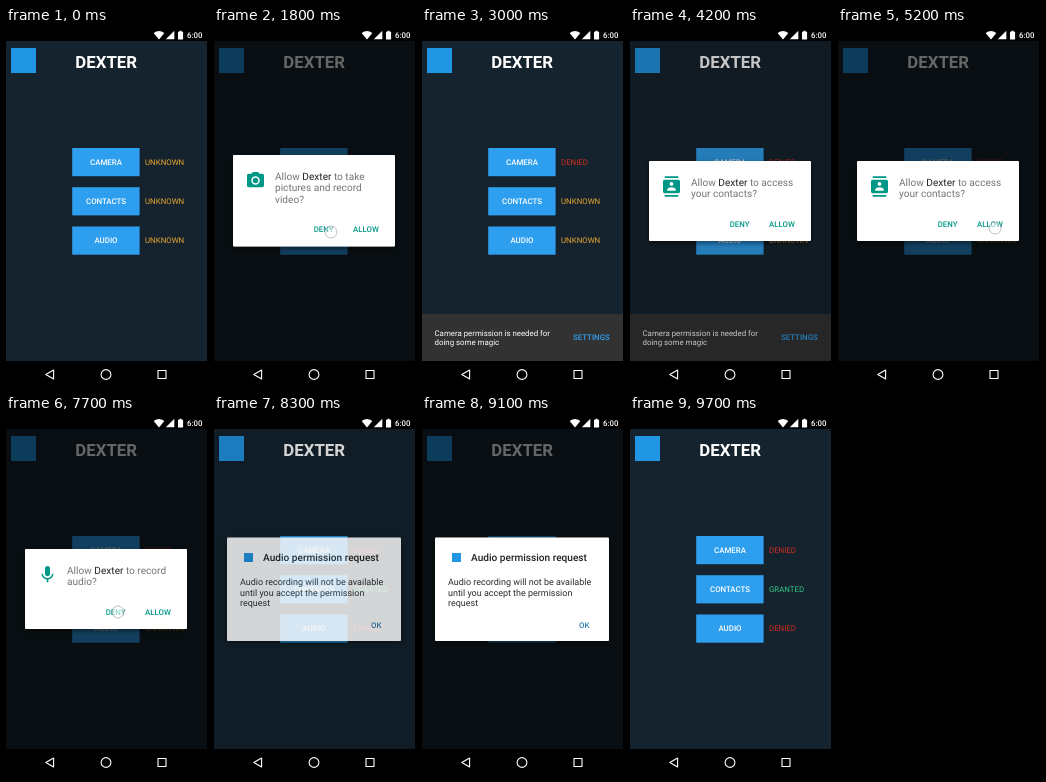
Animation of 202 by 360 pixels, one loop 9800 ms. Source, as an HTML page:

```html
<!DOCTYPE html>
<html lang="en">
<head>
<meta charset="utf-8">
<title>Permission requests</title>
<style>
  html, body { margin: 0; width: 100%; height: 100%; overflow: hidden; background: #000; }
  svg { display: block; width: 100vw; height: 100vh; }
  text { font: 400 7.86px Roboto, sans-serif; text-rendering: geometricPrecision; }
  .med { font-weight: 500; }
  .mid { text-anchor: middle; }
  .title { font-size: 16.83px; font-weight: 700; fill: #fff; }
  .ask { font-size: 10.1px; fill: #757575; }
  .body { font-size: 8.98px; fill: #2b2b2b; }
  .teal { fill: #009688; }
</style>
</head>
<body>
<svg id="stage" viewBox="0 0 202 360">
  <defs>
    <filter id="shadow" x="-20%" y="-20%" width="140%" height="150%">
      <feDropShadow dx="0" dy="2" stdDeviation="2.5" flood-color="#000" flood-opacity=".5"/>
    </filter>
    <clipPath id="screen"><rect width="201" height="333"/></clipPath>
  </defs>

  <g clip-path="url(#screen)">
    <rect width="202" height="333" fill="#14232d"/>
    <rect width="202" height="13"/>
    <rect x="5" y="20" width="25" height="25" fill="#2196e3"/>
    <text class="title mid" x="100.2" y="40">DEXTER</text>
    <g id="rows"></g>
    <g id="snack">
      <rect y="286" width="202" height="47" fill="#323232"/>
      <g fill="#fff">
        <text x="12.5" y="308">Camera permission is needed for</text>
        <text x="12.5" y="317.2">doing some magic</text>
      </g>
      <text class="med" x="151" y="312.4" fill="#2e9fee">SETTINGS</text>
    </g>
    <rect id="dim" width="202" height="333"/>
  </g>

  <g id="dialogs"></g>

  <g id="alert">
    <rect x="13" y="121.5" width="174" height="103.5" rx="1" fill="#fff" filter="url(#shadow)"/>
    <rect x="30" y="137" width="9" height="9" fill="#2196e3"/>
    <text class="med" x="49" y="144.8" style="font-size:10.1px" fill="#212121">Audio permission request</text>
    <text class="body" x="26" y="169.2">Audio recording will not be available</text>
    <text class="body" x="26" y="179.8">until you accept the permission</text>
    <text class="body" x="26" y="190.3">request</text>
    <text class="med" x="157" y="211.8" fill="#2a7fb0">OK</text>
  </g>

  <g id="touch">
    <circle r="6" fill="#fff" fill-opacity=".4" stroke="#888" stroke-opacity=".65" stroke-width=".8"/>
    <circle r="3" fill="#fff" fill-opacity=".35"/>
  </g>

  <g fill="#fff">
    <path d="M153 11.6L147.7 5Q153 1 158.3 5Z"/>
    <path d="M168.3 2.8V11.3H159.8Z"/>
    <path d="M172 3.7H173.5V2.7H175.6V3.7H177.1V11.5H172Z"/>
    <text class="med" x="181" y="10">6:00</text>
  </g>
  <rect y="333" width="202" height="27"/>
  <g fill="none" stroke="#fff" stroke-width="1.1" stroke-linejoin="round">
    <path d="M47.6 342V351L39.8 346.5Z"/>
    <circle cx="100" cy="346.5" r="4.9"/>
    <rect x="152" y="342.5" width="8" height="8"/>
  </g>
</svg>
<script>
const LOOP = 9800, STEP = 100, DIM = 0.6;
const $ = id => document.getElementById(id);
const clamp = v => Math.min(1, Math.max(0, v));
const ramp = (t, a, b) => clamp((t - a) / (b - a));
const easeOut = p => 1 - (1 - p) ** 3;

const COLORS = { UNKNOWN: '#e9a634', DENIED: '#d92c22', GRANTED: '#35c98c' };
const rows = [
  { name: 'CAMERA', y: 120, at: 2000, result: 'DENIED' },
  { name: 'CONTACTS', y: 159.2, at: 5400, result: 'GRANTED' },
  { name: 'AUDIO', y: 198.5, at: 8100, result: 'DENIED' }
];

const ICONS = {
  camera: 'M9 2L7.17 4H4c-1.1 0-2 .9-2 2v12c0 1.1.9 2 2 2h16c1.1 0 2-.9 2-2V6c0-1.1-.9-2-2-2h-3.17L15 2H9zm3 15c-2.76 0-5-2.24-5-5s2.24-5 5-5 5 2.24 5 5-2.24 5-5 5zM12 8.8a3.2 3.2 0 1 0 0 6.4 3.2 3.2 0 0 0 0-6.4z',
  contacts: 'M20 0H4v2h16V0zM4 24h16v-2H4v2zM20 4H4c-1.1 0-2 .9-2 2v12c0 1.1.9 2 2 2h16c1.1 0 2-.9 2-2V6c0-1.1-.9-2-2-2zm-8 2.75c1.24 0 2.25 1.01 2.25 2.25s-1.01 2.25-2.25 2.25S9.75 10.24 9.75 9 10.76 6.75 12 6.75zM17 17H7v-1.5c0-1.67 3.33-2.5 5-2.5s5 .83 5 2.5V17z',
  mic: 'M12 14c1.66 0 3-1.34 3-3V5c0-1.66-1.34-3-3-3S9 3.34 9 5v6c0 1.66 1.34 3 3 3zm5.3-3c0 3-2.54 5.1-5.3 5.1S6.7 14 6.7 11H5c0 3.41 2.72 6.23 6 6.72V21h2v-3.28c3.28-.48 6-3.3 6-6.72h-1.7z'
};

// "open" and "close" are the times when each window starts to fade
const dialogs = [
  { icon: 'camera', top: 127, h: 91.5, lines: ['to take', 'pictures and record', 'video?'], open: 850, close: 1900 },
  { icon: 'contacts', top: 133, h: 80, lines: ['to access', 'your contacts?'], open: 4050, close: 5300 },
  { icon: 'mic', top: 133, h: 80, lines: ['to record', 'audio?'], open: 6800, close: 8000 }
];
const alertBox = { open: 8190, close: 9500 };

const touches = [
  { x: 104, y: 137, from: 500, to: 800 },
  { x: 117, y: 204, from: 1600, to: 1900 },
  { x: 104, y: 176, from: 3700, to: 4000 },
  { x: 157, y: 200, from: 5000, to: 5300 },
  { x: 104, y: 216, from: 6400, to: 6750 },
  { x: 112, y: 196, from: 7700, to: 8000 },
  { x: 162, y: 209, from: 9400, to: 9600 }
];

$('rows').innerHTML = rows.map(r => `
  <rect x="66.2" y="${r.y}" width="67.4" height="28.2" fill="#2e9fee"/>
  <text class="med mid" x="100" y="${r.y + 16.9}" fill="#fff">${r.name}</text>
  <text class="status" x="139" y="${r.y + 16.9}"></text>`).join('');
const labels = document.querySelectorAll('.status');

$('dialogs').innerHTML = dialogs.map(d => {
  const [first, ...rest] = d.lines;
  const y = d.top + 24.5, foot = d.top + d.h - 14.2;
  const iconY = d.top + 15.3;
  return `<g>
    <rect x="19" y="${d.top}" width="162" height="${d.h}" rx="1" fill="#fff" filter="url(#shadow)"/>
    <path class="teal" fill-rule="evenodd" transform="translate(31.3 ${iconY}) scale(.85)" d="${ICONS[d.icon]}"/>
    <text class="ask" x="61" y="${y}">Allow <tspan fill="#212121">Dexter</tspan> ${first}</text>
    ${rest.map((s, i) => `<text class="ask" x="61" y="${y + 11.85 * (i + 1)}">${s}</text>`).join('')}
    <text class="med teal" x="99.7" y="${foot}">DENY</text>
    <text class="med teal" x="139" y="${foot}">ALLOW</text>
  </g>`;
}).join('');
const boxes = [...$('dialogs').children, $('alert')];
const windows = [...dialogs, alertBox];

function show(el, alpha) {
  el.style.display = alpha > 0 ? '' : 'none';
  el.setAttribute('opacity', alpha);
}

function draw(t) {
  rows.forEach((r, i) => {
    const state = t < r.at ? 'UNKNOWN' : r.result;
    labels[i].textContent = state;
    labels[i].setAttribute('fill', COLORS[state]);
  });

  let dim = 0;
  windows.forEach((w, i) => {
    const gone = ramp(t, w.close, w.close + 200);
    show(boxes[i], ramp(t, w.open, w.open + 135) * (1 - gone));
    dim = Math.max(dim, DIM * ramp(t, w.open, w.open + 400) * (1 - gone));
  });
  $('dim').setAttribute('opacity', dim);

  const shown = easeOut(ramp(t, 1950, 2200)) * (1 - ramp(t, 4800, 5050) ** 2);
  $('snack').setAttribute('transform', `translate(0 ${47 * (1 - shown)})`);

  const tap = touches.find(p => t >= p.from && t < p.to);
  show($('touch'), tap ? 1 : 0);
  if (tap) $('touch').setAttribute('transform', `translate(${tap.x} ${tap.y})`);
}

const start = performance.now();
function tick() {
  const t = (performance.now() - start) % LOOP;
  draw(Math.floor(t / STEP) * STEP);
  requestAnimationFrame(tick);
}
tick();
</script>
</body>
</html>
```
